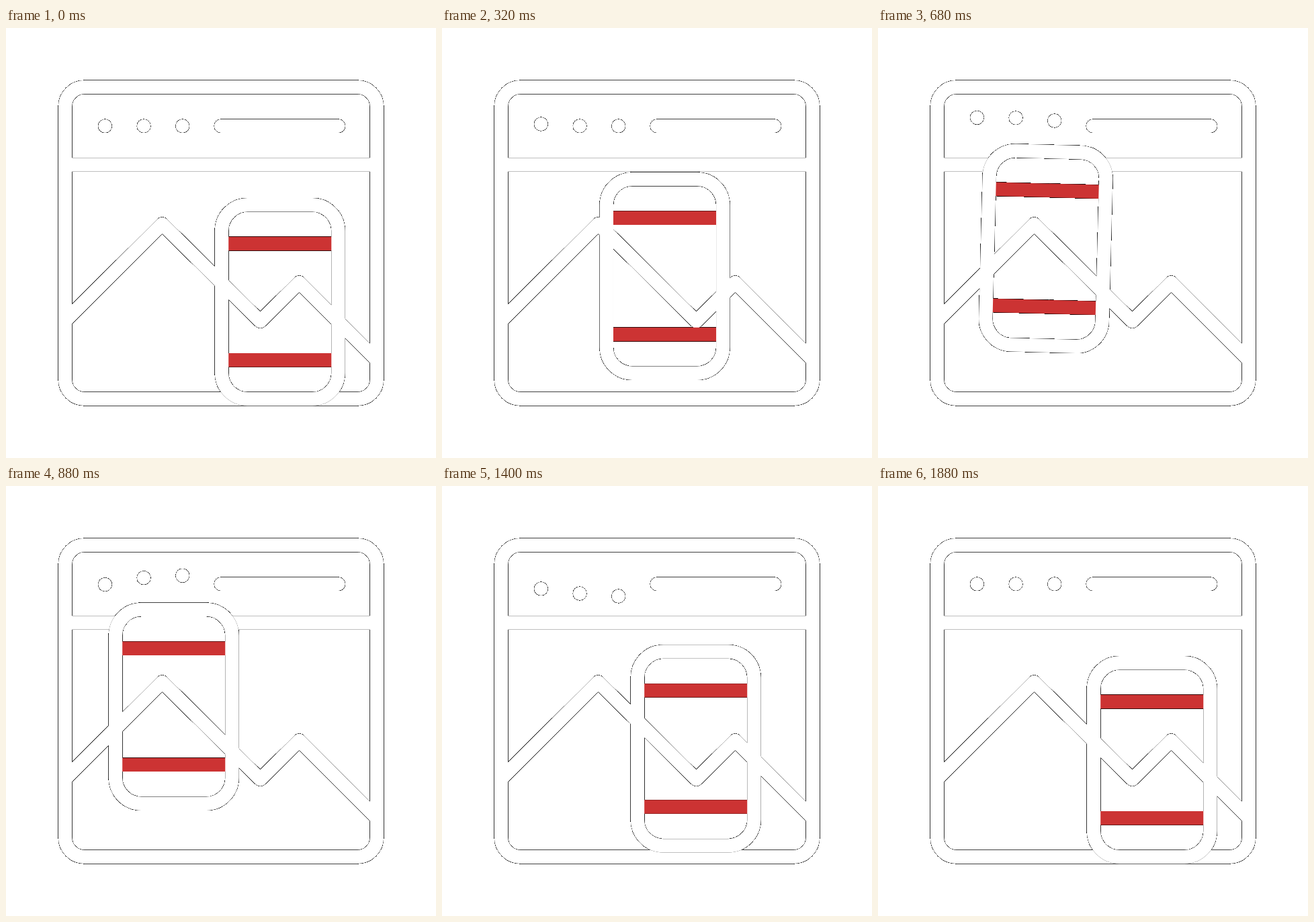
An HTML page that plays this animation: 640 by 640 pixels, repeating every 1920 ms.

```html
<!DOCTYPE html>
<html lang="en">
<head>
<meta charset="utf-8">
<title>Responsive design icon</title>
<style>
  html, body { margin: 0; width: 100%; height: 100%; overflow: hidden; background: #fff; }
  svg { display: block; width: 100vw; height: 100vh; }
  .line { fill: none; stroke: #fff; stroke-width: 20.4; stroke-linejoin: round; }
  .bar { stroke: #c33; stroke-width: 20.4; }
</style>
</head>
<body>
<svg viewBox="0 0 640 640">
  <defs>
    <!-- Puts black behind partly covered edge pixels, giving hairline outlines -->
    <filter id="hairline" filterUnits="userSpaceOnUse" x="0" y="0" width="640" height="640"
            color-interpolation-filters="sRGB">
      <feComponentTransfer in="SourceGraphic" result="backing">
        <feFuncR type="linear" slope="0"/>
        <feFuncG type="linear" slope="0"/>
        <feFuncB type="linear" slope="0"/>
        <feFuncA type="linear" slope="40" intercept="-1"/>
      </feComponentTransfer>
      <feMerge>
        <feMergeNode in="backing"/>
        <feMergeNode in="SourceGraphic"/>
      </feMerge>
    </filter>
    <rect id="body" x="321" y="263.2" width="173.5" height="288.8" rx="38.5"/>
    <mask id="behindPhone" maskUnits="userSpaceOnUse" x="0" y="0" width="640" height="640">
      <rect width="640" height="640" fill="#fff"/>
      <g class="phone" stroke="#000" stroke-width="20.4"><use href="#body"/></g>
    </mask>
  </defs>

  <g filter="url(#hairline)">
    <g class="line" mask="url(#behindPhone)">
      <rect x="88" y="88" width="464" height="464" rx="28.9"/>
      <path d="M88 203.5H552"/>
    </g>
    <path class="line" d="M320 145.85H494.7" stroke-linecap="round"/>
    <g fill="#fff">
      <circle class="dot" cx="147.4" r="10.2"/>
      <circle class="dot" cx="205.1" r="10.2"/>
      <circle class="dot" cx="262.7" r="10.2"/>
    </g>
    <path class="line" d="M88 436L232.5 291.8L378.5 436.5L436.5 378.8L552 494.3"/>
    <g class="phone">
      <path class="bar" d="M321 321H494.5M321 494.2H494.5"/>
      <use class="line" href="#body"/>
    </g>
  </g>
</svg>
<script>
  const LOOP = 1920, STEP = 40;
  const phones = document.querySelectorAll('.phone');
  const dots = document.querySelectorAll('.dot');

  // Eased progress from 0 to 1 over a span of time
  function ease(t, start, length) {
    const p = Math.min(1, Math.max(0, (t - start) / length));
    return p * p * (3 - 2 * p);
  }

  function dotY(t) {
    return 145.9 - 12.7 * ease(t, 188, 430)
                 + 30.9 * ease(t, 660, 483)
                 - 18.2 * ease(t, 1143, 445);
  }

  function phonePose(t) {
    const back = ease(t, 1051, 484);
    const away = ease(t, 71, 510) - back;
    const bow = back * (1 - back) * (3.8 + 8.2 * back);
    const swing = Math.min(1, Math.max(0, (t - 566) / 243));
    const tilt = 1.5 * Math.sin(Math.PI * swing);
    return `translate(${-158 * away} ${-79.3 * away - bow}) rotate(${tilt} 407.75 407.6)`;
  }

  function draw(t) {
    const pose = phonePose(t);
    phones.forEach(phone => phone.setAttribute('transform', pose));
    dots.forEach((dot, i) => dot.setAttribute('cy', dotY(t - 120 * i)));
  }

  const begin = performance.now();
  function tick() {
    const t = (performance.now() - begin) % LOOP;
    draw(Math.floor(t / STEP) * STEP);
    requestAnimationFrame(tick);
  }
  tick();
</script>
</body>
</html>
```
